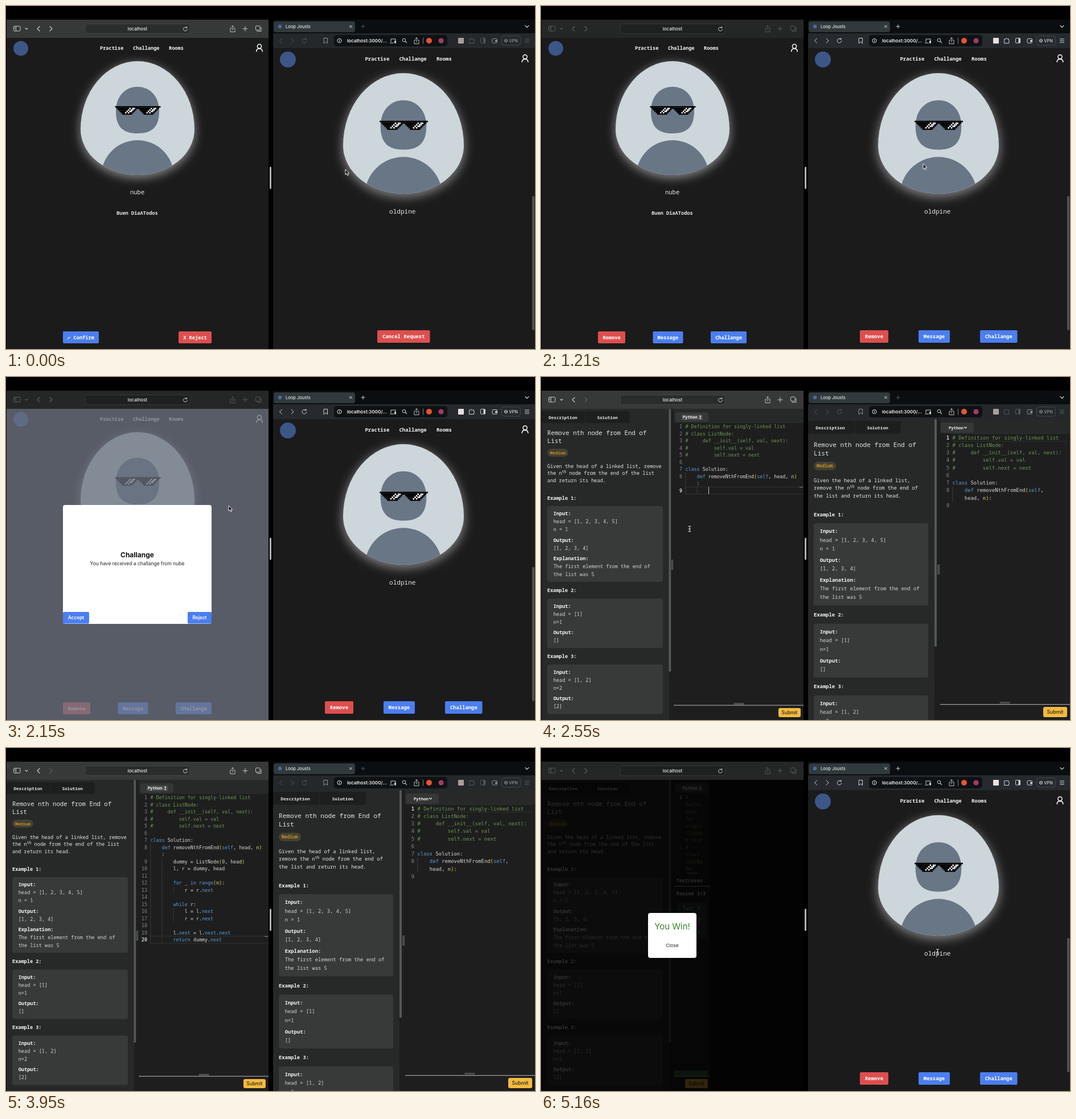
Animation of 929x603 px, one loop 5970 ms. Source, as an HTML page:

```html
<!DOCTYPE html>
<html lang="en">
<head>
<meta charset="utf-8">
<title>Coding duel demo</title>
<style>
  html, body { margin: 0; width: 100%; height: 100%; overflow: hidden; background: #000; }
  svg { display: block; width: 100%; height: 100%; }
  text { white-space: pre; }
  .mono { font-family: "Noto Sans Mono", "DejaVu Sans Mono", monospace; }
  .code { font-family: "DejaVu Sans Mono", monospace; }
  .sans { font-family: Inter, "Liberation Sans", sans-serif; }
  .scene { visibility: hidden; }
</style>
</head>
<body>
<svg id="stage" viewBox="0 0 929 603" xmlns="http://www.w3.org/2000/svg"></svg>
<script>
const HOLDS = [690, 860, 1000, 810, 990, 810, 810];
const LOOP = HOLDS.reduce((a, b) => a + b);
const BLUE = '#4b7ef0', RED = '#dd4f4e', PAGE = '#1b1b1b', PANEL = '#262928';
const PLAYER_A = 'nube', PLAYER_B = 'oldpine', APP = 'Loop Jousts';

// drawing helpers
const rect = (x, y, w, h, fill, r = 0, extra = '') =>
  `<rect x="${x}" y="${y}" width="${w}" height="${h}" fill="${fill}" rx="${r}" ${extra}/>`;
const disc = (x, y, r, fill, extra = '') => `<circle cx="${x}" cy="${y}" r="${r}" fill="${fill}" ${extra}/>`;
const line = (d, color, w = 1) =>
  `<path d="${d}" fill="none" stroke="${color}" stroke-width="${w}" stroke-linecap="round" stroke-linejoin="round"/>`;
const text = (cls, x, y, s, size, fill, weight, anchor = 'start') =>
  `<text class="${cls}" x="${x}" y="${y}" font-size="${size}" fill="${fill}" font-weight="${weight}" text-anchor="${anchor}">${s}</text>`;
const mono = (x, y, s, adv, fill = '#e6e6e6', weight = 500) => text('mono', x, y, s, adv / 0.6, fill, weight);
const sans = (x, y, s, size, fill, weight = 400, anchor = 'middle') => text('sans', x, y, s, size, fill, weight, anchor);
const chevron = (x, y, w, h, color, lw = 1.1) => line(`M${x - w} ${y - h}l${w} ${2 * h}l${w} ${-2 * h}`, color, lw);
const reload = (x, y, r, color) =>
  line(`M${x + r * .7} ${y - r * .7}A${r} ${r} 0 1 0 ${x + r} ${y + .4}M${x + r * .8} ${y - r - .8}v${r * .6}h${-r * .6}`, color);
const share = (x, y, c) =>
  line(`M${x - 2} ${y - 1.5}h-2v6.5h8v-6.5h-2M${x} ${y + 2}v-8M${x - 2} ${y - 4}l2 -2l2 2`, c, .9);
const plus = (x, y, r, c) => line(`M${x - r} ${y}h${2 * r}M${x} ${y - r}v${2 * r}`, c);

// browser chrome
function leftChrome(focus, forward) {
  const c = focus ? '#c9c9c9' : '#595b5a', f = forward ? c : '#5c5d5d';
  return rect(1, 24, 460, 32, focus ? '#373838' : '#252726') +
    rect(139, 31.5, 184, 17, focus ? '#2b2c2c' : '#1f2120', 4, `stroke="${focus ? '#4a4b4b' : '#3a3c3b'}" stroke-width=".8"`) +
    sans(231, 43, 'localhost', 7.9, '#ededed', 500) + reload(315, 40.5, 3.4, '#cfcfcf') +
    rect(13.5, 35.5, 11.5, 8.5, 'none', 1.5, `stroke="${c}"`) + line('M17.5 35.5v8.5M15 38h1M15 40h1', c, .9) +
    chevron(36, 40, 2, 1, c) + line('M59 36l-4 4l4 4', c, 1.2) + line('M77 36l4 4l-4 4', f, 1.2) +
    share(398, 40.5, c) + plus(420, 40, 4, c) +
    rect(438.5, 35, 7.5, 7.5, 'none', 1.5, `stroke="${c}"`) + line('M448 37.5v7h-7', c);
}

function rightChrome(focus) {
  const c = focus ? '#d2d4d6' : '#909498', dim = focus ? c : '#555a5e';
  return rect(469, 24, 460, 24, '#0b0e11') + rect(470, 27, 143, 19, '#303a3d', 4) +
    rect(469, 48, 460, 26, focus ? '#262a2e' : '#24282a') +
    disc(481, 36, 3.2, '#4b6aa3') + sans(491, 38.8, APP, 7.5, '#e2e5e6', 500, 'start') +
    line('M603.5 34l4 4M607.5 34l-4 4', '#e0e0e0') + plus(627, 36, 3, dim) + chevron(915, 36, 3, 1.5, '#c8c8c8', 1.2) +
    line('M484.5 57l-4 4l4 4', dim) + line('M501 57l4 4l-4 4', dim) + reload(524, 61, 3.8, dim) +
    line('M558.5 56.5h6v9l-3 -2.5l-3 2.5z', c) +
    rect(576, 51, 199, 20, '#0f1214', 5) + disc(585.5, 61, 3.6, 'none', 'stroke="#e4e4e4"') +
    line('M585.5 60.5v2M585.5 59v.1', '#e4e4e4') +
    sans(599, 64, 'localhost:3000/...', 8.1, '#f0f0f0', 600, 'start') +
    line('M676 63v-5h8v3M674.5 65h6', '#d0d0d0') + rect(682, 61, 3, 4.5, '#d0d0d0', .5) +
    disc(699, 60, 2.8, 'none', 'stroke="#d0d0d0"') + line('M701.2 62.2l2.5 2.5', '#d0d0d0', 1.2) +
    share(721, 61.5, '#d0d0d0') + line('M732.5 56v10', '#9a9a9a', .8) +
    disc(743, 61, 5, '#ec5330') + disc(764, 61, 4.6, '#a33a6b') +
    rect(794, 56, 10, 10, focus ? '#eadfdf' : '#ad9c9c', 1) +
    line('M814 58h2.5q1 -3 2 0h3v3q3 1 0 2v2.5h-7.5z', dim) +
    rect(833.5, 56.5, 8, 8.5, 'none', 1, `stroke="${dim}"`) + rect(838.5, 57, 3, 8, dim) +
    rect(854, 57.5, 8.5, 7.5, 'none', 1.5, `stroke="${c}"`) + rect(859, 60, 4, 3, c) +
    rect(870.5, 52.5, 33, 16.5, 'none', 4, 'stroke="#4c5155" stroke-width=".8"') +
    disc(878, 61, 2.6, 'none', `stroke="${c}"`) + line('M876.5 61h3', c) + sans(891, 63.7, 'VPN', 7.4, c, 500) +
    line('M911.5 58h7M911.5 61h7M911.5 64h7', dim);
}

// profile page
const egg = 'M0 120A100 120 0 0 1 200 120A100 80 0 0 1 0 120Z';
function shades() {
  const u = 2.5, px = (x, y, w, fill, h = 1) => rect(60.5 + x * u, 79 + y * u, w * u, h * u, fill);
  let s = px(0, 0, 32, '#050505') + px(1, 1, 30, '#050505');
  for (const x of [2, 17]) {
    for (let r = 0; r < 4; r++) s += px(x + r, 2 + r, 13 - 2 * r, '#050505', 1.05);
    for (let r = 0; r < 4; r++)
      for (const k of [0, 2, 3]) if (k < 3 || r < 3) s += px(x + 8 - r + k, 1.2 + r, 1, '#eee');
  }
  return s;
}
const avatar = (x, y, k) => `<g transform="translate(${x} ${y}) scale(${k})">
  <path d="${egg}" fill="#fff" fill-opacity=".42" filter="url(#glow)" transform="translate(-2 2.5) scale(1.02)"/>
  <path d="${egg}" fill="#cdd6db"/>
  <g clip-path="url(#egg)" fill="#697686"><circle cx="100" cy="203" r="64"/>
  <path d="M62 88C62 62 78 45 100 45C122 45 138 62 138 88C138 117 124 127 100 127C76 127 62 117 62 88Z"/></g>${shades()}</g>`;
const person = (x, y) => disc(x, y - 2.7, 3.6, 'none', 'stroke="#fff" stroke-width="1.5"') +
  line(`M${x - 5.3} ${y + 6.5}q0 -5 5.3 -5q5.3 0 5.3 5`, '#fff', 1.5);
const nav = (xs, y, adv) => ['Practise', 'Challange', 'Rooms'].map((s, i) => mono(xs[i], y, s, adv, '#f4f4f4', 700)).join('');
const button = (x, y, w, h, label, adv, fill) => rect(x, y, w, h, fill, 2) +
  text('mono', x + w / 2, y + h / 2 + 3, label, adv / 0.6, '#fff', 700, 'middle');

function leftProfile(friends) {
  const b = (x, w, s, fill) => button(x, 572, w, 21, s, 5.2, fill);
  return rect(1, 56, 460, 547, PAGE) + disc(26, 74.5, 13, '#3d5688') + nav([165, 223, 286], 77, 5.17) + person(445, 73.5) +
    avatar(131, 97, 1) + mono(218, 331, PLAYER_A, 6.3) + mono(194, 367, 'Buen DiaATodos', 5.2, '#e6e6e6', 700) +
    (friends ? b(100, 48, 'Remove', RED) + b(196.5, 53, 'Message', BLUE) + b(298, 63, 'Challange', BLUE)
             : b(100, 63, '✔ Confirm', BLUE) + b(303, 58, 'X Reject', RED));
}
function rightProfile(friends) {
  const b = (x, w, s, fill) => button(x, 570, w, 22, s, 5.33, fill);
  return rect(469, 74, 460, 529, PAGE) + disc(495, 94, 14, '#3d5688') + nav([630.5, 690.5, 756], 95.5, 5.36) + person(911.5, 92) +
    avatar(592, 118, 1.06) + mono(673, 365, PLAYER_B, 6.63) + rect(924, 334, 4, 236, '#525454', 2) +
    (friends ? b(560, 50, 'Remove', RED) + b(663, 55, 'Message', BLUE) + b(771, 65.5, 'Challange', BLUE)
             : b(652, 92.5, 'Cancel Request', RED));
}
const invite = () => rect(1, 56, 460, 547, 'rgba(107,114,128,.75)') + rect(100, 225, 261, 209, '#fff', 4) +
  sans(230.5, 316.5, 'Challange', 12, '#111', 700) +
  sans(230.5, 330.5, `You have received a challange from ${PLAYER_A}`, 8.5, '#222') +
  rect(100, 413, 46, 20.5, BLUE, 2) + sans(123, 426.3, 'Accept', 8.3, '#fff', 600) +
  rect(319, 413, 42, 20.5, BLUE, 2) + sans(340, 426.3, 'Reject', 8.3, '#fff', 600);

// problem page
const EXAMPLES = [
  { y: 215.5, h: 133, rows: [[243, 'Input:'], [257, 'head = [1, 2, 3, 4, 5]'], [271, 'n = 1'], [289.5, 'Output:'], [303.5, '[1, 2, 3, 4]'],
    [321.5, 'Explanation:'], [335.5, 'The first element from the end of'], [349.5, 'the list was 5']] },
  { y: 378, h: 87, rows: [[405.5, 'Input:'], [419.5, 'head = [1]'], [434, 'n=1'], [452, 'Output:'], [466, '[]']] },
  { y: 494, h: 87, rows: [[521.5, 'Input:'], [535.5, 'head = [1, 2]'], [550, 'n=2'], [568, 'Output:'], [582, '[2]']] }
];
const grip = (x, y, w, h) => {
  let d = '';
  for (let i = .5; i < Math.max(w, h); i += 2) d += w > h ? `M${x + i} ${y}v${h}` : `M${x} ${y + i}h${w}`;
  return `<path d="${d}" stroke="#a5a8a6" stroke-width="1" stroke-dasharray="1.3 .8"/>`;
};

function statement(o) {
  const { x, adv, k } = o, Y = y => o.ex + (y - 215.5) * k;
  let s = rect(x - 10, o.top, o.w, 603 - o.top, PANEL);
  o.tabs.forEach(([tx, tw, lx, label]) => {
    s += rect(tx, o.tabTop, tw, 21 * k, '#1d1f1e', 3) + mono(lx, o.tabBase, label, o.tabAdv, '#e8e8e8', 700);
  });
  s += mono(x, o.title[0], 'Remove nth node from End of', o.big) + mono(x, o.title[1], 'List', o.big) +
    rect(x, o.pill, 37 * o.pk, 14 * o.pk, '#454132', 7.5) + mono(x + 5, o.pill + 10.2, 'Medium', 4.5 * o.pk, '#c28b2b', 700);
  o.body.forEach(([y, line]) => {
    const [a, b] = line.split('^');
    s += mono(x, y, a, adv);
    if (b) s += mono(x + a.length * adv, y - 3, 'th', adv * .75) + mono(x + (a.length + 1.5) * adv, y, b, adv);
  });
  EXAMPLES.forEach((e, i) => {
    s += mono(x, Y(e.y), `Example ${i + 1}:`, adv, '#f0f0f0', 700) + rect(x, Y(e.y + 11.5), o.card, e.h * k, '#383a39', 4);
    e.rows.forEach(([y, t]) => {
      const head = /^[A-Z]\w+:$/.test(t);
      s += mono(x + 10.7, Y(y), t, adv, head ? '#f4f4f4' : '#d2d3d2', head ? 700 : 400);
    });
  });
  return s;
}
const KEYS = /(\b(?:class|def|self|for|in|range|while|next|return)\b|[()]|\b\d+\b)/;
const tint = s => s.split(KEYS).map((p, i) => i % 2
  ? `<tspan fill="${/[()]/.test(p) ? '#ffd700' : /\d/.test(p) ? '#b5cea8' : '#569cd6'}">${p}</tspan>` : p).join('');

// a leading "~" marks a wrapped row
function editor(x, numX, y, pitch, adv, rows, active, right) {
  let s = '', n = 0, note = false;
  const size = adv / 0.602;
  rows.forEach((row, i) => {
    const wrap = row[0] === '~', body = wrap ? row.slice(1) : row, base = y + i * pitch, top = base - pitch * .75;
    if (!wrap) {
      n++;
      note = body[0] === '#';
      if (n === active) s += `<path d="M${x} ${top}H${right}M${x} ${top + pitch}H${right}" stroke="#343635" stroke-width=".8"/>`;
      s += text('code', numX, base, n, size, n === active ? '#d0d0d0' : '#858585', n === active ? 700 : 400, 'end');
    }
    const indent = body.search(/\S|$/);
    for (let c = 0; c < indent; c += 4)
      s += rect(x + c * adv, top, .7, pitch, '#444645');
    s += text('code', x + indent * adv, base, note ? body.trim() : tint(body.trim()), size, note ? '#6a9955' : '#d8d8d8', 400);
  });
  return s;
}
const HEAD = ['# Definition for singly-linked list', '# class ListNode:', '#     def __init__(self, val, next):',
  '#         self.val = val', '#         self.next = next', '', 'class Solution:'];
const LEFT_HEAD = [...HEAD, '    def removeNthFromEnd(self, head, n)', '~    :'];
const START = [...LEFT_HEAD, '        '];
const SOLVED = [...LEFT_HEAD, '        dummy = ListNode(0, head)', '        l, r = dummy, head', '        ',
  '        for _ in range(n):', '            r = r.next', '        ', '        while r:', '            l = l.next',
  '            r = r.next', '        ', '        l.next = l.next.next', '        return dummy.next'];
const OTHER = [...HEAD, '    def removeNthFromEnd(self,', '~    head, n):', ''];
const NARROW = ['#', '~Defini', '~tion', '~for', '~singly', '~-linke', '~d list', '#', '~class', '~ListNo', '~de:'];

const leftStatement = () => statement({
  x: 11, w: 224, top: 56, adv: 5.15, big: 6.45, k: 1, pk: 1, ex: 215.5, card: 203, tabTop: 60, tabBase: 73.5, tabAdv: 4.55,
  tabs: [[1, 76.5, 13.5, 'Description'], [78.5, 77, 98.5, 'Solution']], title: [101.5, 116], pill: 126,
  body: [[160, 'Given the head of a linked list, remove'], [172.3, 'the n^ node from the end of the list'], [184.6, 'and return its head.']]
}) + rect(225, 56, 8, 547, '#1e1e1e') + rect(224.5, 56, 3.7, 462, '#565857', 1.5) + grip(229, 321.5, 3, 17);

const picker = () => rect(236, 62, 58, 17, '#353736', 4) + rect(247, 66, 37, 9.5, '#4b4d4c') + mono(249, 73.3, 'Python', 4.25, '#f0f0f0', 700) +
  `<path d="M278 70l1.8 -3l1.8 3zM278 71.5l1.8 3l1.8 -3z" fill="#eee"/>`;
const submit = (x, y, w, h, size) => rect(x, y, w, h, '#f3ba41', 3) + sans(x + w / 2, y + h / 2 + 3, 'Submit', size, '#2a2410', 500);

const leftCode = (rows, active) => leftStatement() + rect(233, 56, 228, 547, '#1e1e1e') + rect(233, 56, 228, 25, PANEL) + picker() +
  editor(253.5, 248, 90.2, 12.5, 5.03, rows, active, 461) +
  rect(454, 80.8 + (rows.length - 1) * 12.5, 6, 1, '#8d8f8e') +
  rect(233, 576.6, 228, 1, '#b9bfbc') + grip(339, 573, 17, 3) + submit(417, 582, 39, 16, 8.3);

const popup = (x, y, w, h, msg, color, size, by, cy) => rect(x, y, w, h, '#fff', 4) +
  sans(x + w / 2, by, msg, size, color) + sans(x + w / 2, cy, 'Close', 8.2, '#222');
const shade = (x, y, w) => rect(x, y, w, 603 - y, 'rgba(0,0,0,.8)');

const leftWin = () => leftStatement() + rect(233, 56, 228, 547, '#111') + rect(233, 56, 64, 547, '#1e1e1e') + picker() +
  editor(253.5, 248, 90.2, 12.5, 5.03, NARROW, 1, 297) + grip(257, 218.5, 17, 3) +
  mono(237.5, 236, 'Testcases', 5.17, '#ddd', 700) + rect(233, 242.6, 64, 1, '#b9bfbc') +
  mono(237.5, 258.5, 'Passed 3/3', 5.17, '#e6e6e6', 700) + rect(239, 272, 52, 62, '#2f3a34', 4) +
  [1, 2, 3].map(i => mono(249, 264 + i * 21, `Test ${i}`, 5.15, '#9fb0a6')).join('') +
  rect(234, 567, 59, 10, '#3a6440') + rect(233, 576.6, 64, 1, '#b9bfbc') + submit(253, 582, 40, 16, 8.3) +
  shade(1, 56, 460) + popup(188, 290, 85, 79, 'You Win!', '#37852c', 15, 319, 350);

const rightCode = () => statement({
  x: 479, w: 223, top: 74, adv: 5.3, big: 6.66, k: 1.087, pk: 1.06, ex: 244.5, card: 201, tabTop: 77, tabBase: 92, tabAdv: 4.65,
  tabs: [[469, 81, 482.5, 'Description'], [551, 81, 572.5, 'Solution']], title: [122.5, 137.5], pill: 149,
  body: [[185, 'Given the head of a linked list,'], [198.3, 'remove the n^ node from the end of'], [211.6, 'the list and return its head.']]
}) + rect(691, 74, 10, 529, '#1e1e1e') + rect(691, 74, 4, 400, '#565857', 1.5) + grip(696.5, 330, 3.5, 18) +
  rect(701, 74, 228, 529, '#1e1e1e') + rect(701, 74, 228, 25, PANEL) + rect(702, 80, 58, 18, '#353736', 4) +
  mono(716, 91.7, 'Python', 4.3, '#f0f0f0', 700) + chevron(745.5, 89, 2, 1, '#eee') +
  editor(722.5, 717, 109.5, 13.28, 5.34, OTHER, 1, 922) + rect(922, 99, .6, 476, '#303231') +
  rect(701, 575.2, 228, 1, '#b9bfbc') + grip(806, 571.2, 18, 3) + submit(882, 580, 42, 18, 8.7);
const rightLose = () => rightCode() + shade(469, 74, 460) +
  popup(645, 296, 106, 84, 'You Loose!', '#c7281f', 15.6, 327, 360);

// pointers
const arrow = (x, y) => `<path d="M${x} ${y}v9.6l2.2 -2l1.6 3.4l1.6 -.8l-1.6 -3.2h3z" fill="#111" stroke="#fff" stroke-width=".9"/>`;
const beam = (x, y) => line(`M${x - 2} ${y - 5}l2 1l2 -1M${x} ${y - 4}v8M${x - 2} ${y + 5}l2 -1l2 1`, '#111', 2.2) +
  line(`M${x - 2} ${y - 5}l2 1l2 -1M${x} ${y - 4}v8M${x - 2} ${y + 5}l2 -1l2 1M${x - 1.5} ${y}h3`, '#e6e6e6', 1.1);

const frame = (leftFocus, left, right, extra = '', forward = false) =>
  left + right + leftChrome(leftFocus, forward) + rightChrome(!leftFocus) +
  rect(461, 24, 8, 579, '#000') + rect(463, 282.5, 3, 39, '#b2b2b2', 1.5) + extra;

const SCENES = [
  frame(true, leftProfile(false), rightProfile(false), arrow(596, 287), true),
  frame(false, leftProfile(true), rightProfile(true), arrow(671, 277)),
  frame(false, leftProfile(true) + invite(), rightProfile(true), arrow(391, 226)),
  frame(true, leftCode(START, 9), rightCode(), rect(294, 193.5, 1, 12.5, '#c8c8c8') + beam(261, 267)),
  frame(true, leftCode(SOLVED, 20), rightCode()),
  frame(true, leftWin(), rightLose(), arrow(494, 371)),
  frame(false, leftWin(), rightProfile(true), beam(696.5, 358.5))
];

// one stepped visibility track per scene
let start = 0, css = '';
SCENES.forEach((_, i) => {
  const a = start / LOOP * 100, b = (start += HOLDS[i]) / LOOP * 100;
  css += `@keyframes scene${i}{0%{visibility:hidden}${a}%{visibility:visible}${b}%{visibility:hidden}` +
    (b < 100 ? '100%{visibility:hidden}' : '') + `}
    .scene${i}{animation:scene${i} ${LOOP}ms step-end infinite}`;
});
document.getElementById('stage').innerHTML =
  `<style>${css}</style><defs><clipPath id="egg"><path d="${egg}"/></clipPath>
  <filter id="glow" x="-25%" y="-25%" width="150%" height="150%"><feGaussianBlur stdDeviation="8"/></filter></defs>` +
  rect(0, 0, 929, 603, '#000') + SCENES.map((s, i) => `<g class="scene scene${i}">${s}</g>`).join('');
</script>
</body>
</html>
```
